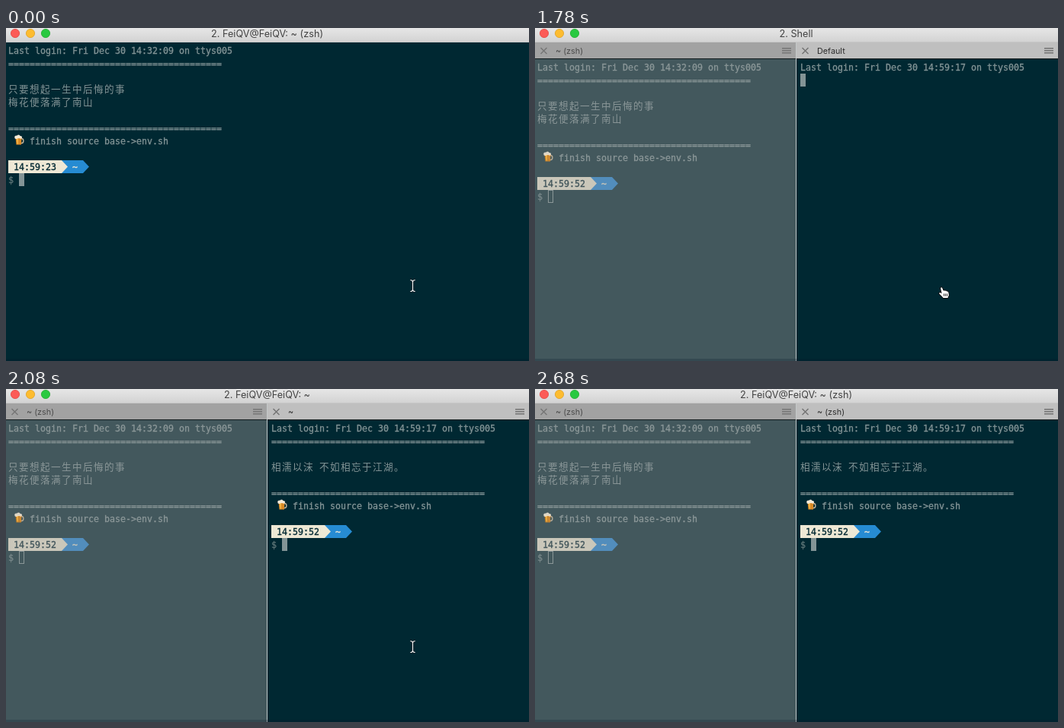
An HTML page with a canvas that plays this animation: 686 by 438 pixels, repeating every 3570 ms.

```html
<!DOCTYPE html>
<html lang="en">
<head>
<meta charset="utf-8">
<title>Terminal split</title>
<style>
  html, body { margin: 0; width: 100%; height: 100%; overflow: hidden; background: #002832; }
  canvas { display: block; width: 686px; height: 438px; }
</style>
</head>
<body>
<canvas id="stage" width="686" height="438"></canvas>
<script>
const ctx = document.getElementById('stage').getContext('2d');
const W = 686, H = 438, LOOP = 3570;
const CELL = 7, ROW = 17;
const MONO = '11.63px "DejaVu Sans Mono", monospace';
const CJK = '12.6px "Noto Sans CJK SC", "Noto Sans CJK", sans-serif';
const UI = 'Inter, Roboto, sans-serif';
const RULE = '='.repeat(40);
const USER = 'FeiQV@FeiQV';

const ACTIVE = { bg: '#002832', text: '#839496', faint: '#5f7678', cream: '#eee8d5',
                 blue: '#268bd2', ink: '#002832', beer: 1 };
const DIMMED = { bg: '#43585d', text: '#8b9798', faint: '#7a898b', cream: '#cac7ba',
                 blue: '#528dbc', ink: '#40545a', beer: 0.85 };

const LEFT_LINES = ['只要想起一生中后悔的事', '梅花便落满了南山'];
const RIGHT_LINES = ['相濡以沫 不如相忘于江湖。'];

function rect(x, y, w, h, color) {
  ctx.fillStyle = color;
  ctx.fillRect(x, y, w, h);
}

function poly(points, color) {
  ctx.fillStyle = color;
  ctx.beginPath();
  points.forEach(([x, y]) => ctx.lineTo(x, y));
  ctx.closePath();
  ctx.fill();
}

function label(s, x, y, size, color, align = 'left') {
  ctx.font = `${size}px ${UI}`;
  ctx.textAlign = align;
  ctx.fillStyle = color;
  ctx.fillText(s, x, y);
}

// Terminal text on a fixed grid; wide glyphs take two cells.
function cells(s, x, top, color) {
  ctx.textAlign = 'left';
  ctx.fillStyle = ctx.strokeStyle = color;
  ctx.lineWidth = 0.3;
  for (const ch of s) {
    const wide = ch > '\u2e7f';
    ctx.font = wide ? CJK : MONO;
    ctx.fillText(ch, x, top + 13);
    if (!wide) ctx.strokeText(ch, x, top + 13);
    x += wide ? 2 * CELL : CELL;
  }
}

function beer(x, y, alpha) {
  ctx.save();
  ctx.globalAlpha = alpha;
  ctx.translate(x, y);
  ctx.strokeStyle = '#c9b9a0';
  ctx.lineWidth = 1.4;
  ctx.beginPath();
  ctx.ellipse(10.5, 8.5, 2.4, 3, 0, 0, Math.PI * 2);
  ctx.stroke();
  poly([[2.5, 4], [10.5, 4], [10, 13.5], [3.5, 13.5]], '#d98a26');
  poly([[4, 5], [6, 5], [6, 12.5], [4.6, 12.5]], '#f3b748');
  ctx.fillStyle = '#f4ead8';
  ctx.beginPath();
  for (const [cx, cy, r] of [[3.4, 3.8, 2.2], [6.4, 2.9, 2.3], [9.2, 3.8, 1.9]]) {
    ctx.moveTo(cx + r, cy);
    ctx.arc(cx, cy, r, 0, Math.PI * 2);
  }
  ctx.fill();
  ctx.restore();
}

function arrow(x, top, w, color) {
  poly([[x, top], [x + w, top + ROW / 2], [x, top + ROW]], color);
}

function prompt(x, top, time, c) {
  rect(x, top, 70, ROW, c.cream);
  rect(x + 70, top, 28, ROW, c.blue);
  arrow(x + 70, top, 8, c.cream);
  arrow(x + 98, top, 8, c.blue);
  cells(time, x + CELL, top, c.ink);
  cells('~', x + 84, top, c.cream);
}

function caret(x, top, c, solid) {
  if (solid) return rect(x, top, CELL, ROW, c.text);
  ctx.strokeStyle = c.text;
  ctx.lineWidth = 1;
  ctx.strokeRect(x + 0.5, top + 0.5, CELL - 1, ROW - 1);
}

function session(x, y, login, lines, time, c, focused) {
  const row = n => y + n * ROW;
  cells(`Last login: Fri Dec 30 ${login} on ttys005`, x, row(0), c.text);
  cells(RULE, x, row(1), c.text);
  lines.forEach((s, i) => cells(s, x, row(3 + i), c.text));
  const n = 4 + lines.length;
  cells(RULE, x, row(n), c.text);
  beer(x + CELL, row(n + 1), c.beer);
  cells('finish source base->env.sh', x + 4 * CELL, row(n + 1), c.text);
  prompt(x, row(n + 3), time, c);
  cells('$', x, row(n + 4), c.faint);
  caret(x + 2 * CELL, row(n + 4), c, focused);
}

function titleBar(title) {
  const g = ctx.createLinearGradient(0, 0, 0, 19);
  g.addColorStop(0, '#e6e6e6');
  g.addColorStop(1, '#d2d2d2');
  rect(0, 0, W, 19, g);
  rect(0, 18, W, 1, '#c6c6c6');
  [['#fc5b57', '#e2443f'], ['#fdbc30', '#dfa023'], ['#29c941', '#1dad2b']].forEach(([fill, edge], i) => {
    ctx.beginPath();
    ctx.arc(12 + 20 * i, 7, 5.6, 0, Math.PI * 2);
    ctx.fillStyle = fill;
    ctx.fill();
    ctx.strokeStyle = edge;
    ctx.lineWidth = 0.8;
    ctx.stroke();
  });
  label(title, 342.5, 12, 12.7, '#434343', 'center');
}

function tab(x, w, name, bg, ink, icon) {
  rect(x, 19, w, 21, bg);
  rect(x, 40, w, 1, '#101a1c');
  ctx.strokeStyle = icon;
  ctx.lineWidth = 1.4;
  ctx.beginPath();
  for (const d of [-1, 1]) {
    ctx.moveTo(x + 11.5 - 4 * d, 26);
    ctx.lineTo(x + 11.5 + 4 * d, 34);
  }
  ctx.stroke();
  label(name, x + 27, 34, 10.8, ink);
  for (let i = 0; i < 3; i++) rect(x + w - 18, 26 + 3 * i, 12, 1.5, icon);
}

function beam(x, y) {
  const trace = (color, width) => {
    ctx.strokeStyle = color;
    ctx.lineWidth = width;
    ctx.beginPath();
    for (const d of [-1, 1]) {
      ctx.moveTo(x - 3.2, y + 7.5 * d);
      ctx.quadraticCurveTo(x, y + 7.5 * d, x, y + 5 * d);
      ctx.quadraticCurveTo(x, y + 7.5 * d, x + 3.2, y + 7.5 * d);
    }
    ctx.moveTo(x, y - 5.5);
    ctx.lineTo(x, y + 5.5);
    ctx.stroke();
  };
  trace('rgba(0,10,14,.55)', 2.6);
  trace('#f2f2f2', 1.2);
}

function hand(x, y) {
  ctx.save();
  ctx.translate(x, y);
  const p = new Path2D('M3 2Q3.6 .6 5 1.6L6.6 5.6Q8 4.7 8.9 5.8Q10.3 5.2 11.2 6.6' +
    'Q13 6.3 13.4 8L13.8 11.4L12.4 15L6.6 15L4 12.2L1.2 9.6Q.7 8 2.4 8L4.5 9.2Z');
  ctx.lineJoin = 'round';
  ctx.strokeStyle = '#000';
  ctx.lineWidth = 1.5;
  ctx.stroke(p);
  ctx.fillStyle = '#fff';
  ctx.fill(p);
  ctx.lineWidth = 0.8;
  ctx.beginPath();
  for (const fx of [7.4, 9.4, 11.4]) {
    ctx.moveTo(fx, 9.4);
    ctx.lineTo(fx + 0.2, 12.8);
  }
  ctx.stroke();
  ctx.restore();
}

function pointer(t) {
  if (t >= 1200 && t < 1930) hand(529, 340);
  else if (t < 2380) beam(533.5, 339);
  else if (t < 2530) beam(599.5, 373);
  else if (t < 2680) beam(640, 437);
}

function windowTitle(t) {
  if (t >= 1780 && t < 2080) return '2. Shell';
  const base = `2. ${USER}: ~`;
  return t >= 2080 && t < 2230 ? base : base + ' (zsh)';
}

function splitView(t) {
  rect(0, 19, 342, H - 19, DIMMED.bg);
  tab(0, 342, '~ (zsh)', '#a2a2a2', '#4a4a4a', '#757575');
  session(3, 43, '14:32:09', LEFT_LINES, t < 1780 ? '14:59:23' : '14:59:52', DIMMED, false);

  const name = t < 1930 ? 'Default' : t < 2230 ? '~' : '~ (zsh)';
  tab(343, 343, name, '#bfbfbf', '#2c2c2c', '#727272');
  if (t >= 1930) {
    session(348, 43, '14:59:17', RIGHT_LINES, '14:59:52', ACTIVE, true);
  } else if (t >= 1780) {
    cells('Last login: Fri Dec 30 14:59:17 on ttys005', 348, 43, ACTIVE.text);
    caret(348, 60, ACTIVE, true);
  } else {
    caret(348, 43, ACTIVE, true);
  }
  rect(342, 19, 1, H - 19, '#c4c8c8');
}

function draw(t) {
  rect(0, 0, W, H, ACTIVE.bg);
  titleBar(windowTitle(t));
  if (t < 1640) session(3, 21, '14:32:09', LEFT_LINES, '14:59:23', ACTIVE, true);
  else splitView(t);
  rect(0, 435, W, 3, 'rgba(0,18,40,.22)');
  pointer(t);
}

const start = performance.now();
function tick() {
  draw((performance.now() - start) % LOOP);
  requestAnimationFrame(tick);
}
tick();
</script>
</body>
</html>
```
